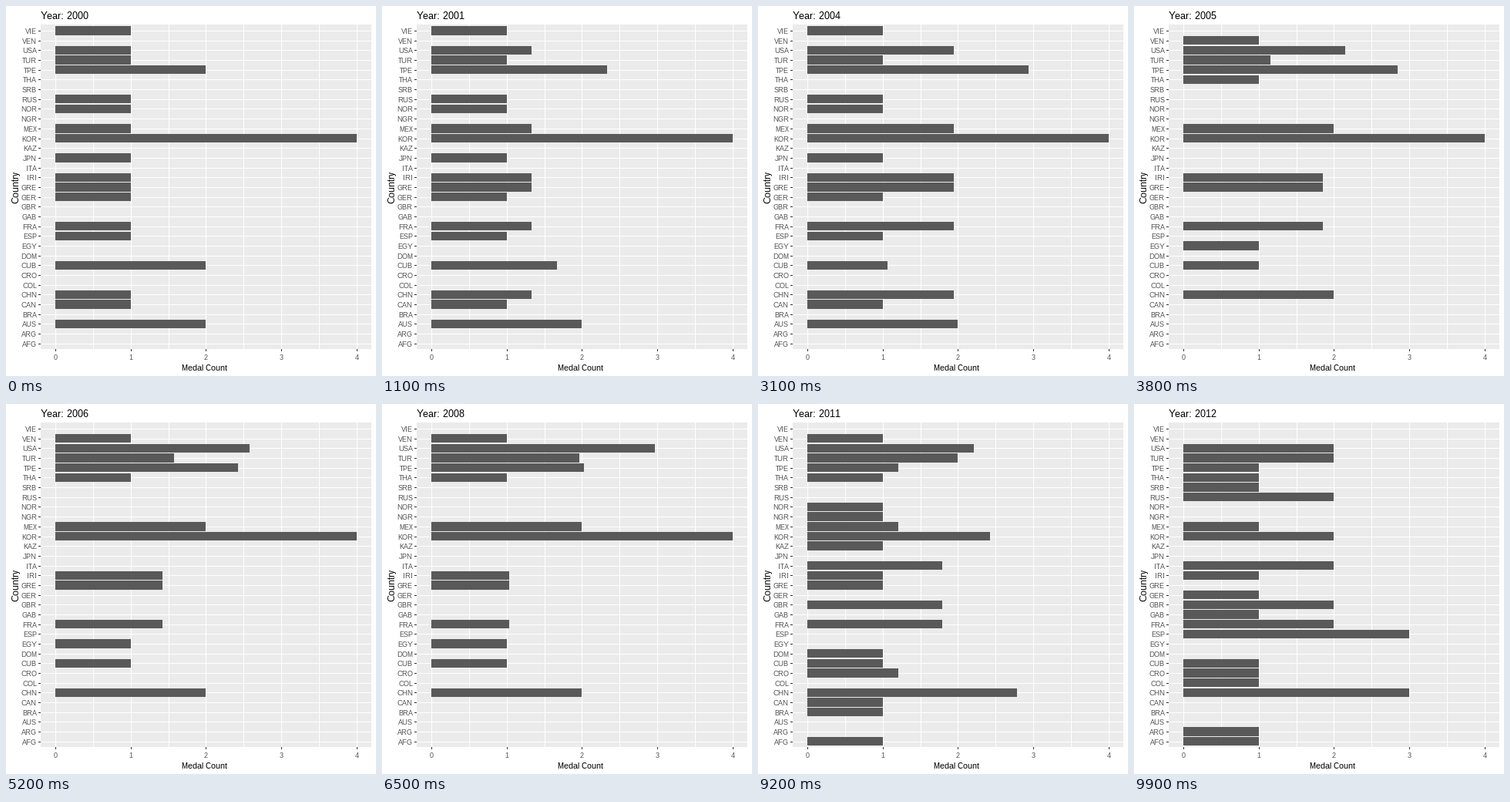
A matplotlib script for the animation above (10000 ms loop, 480 by 480 pixels).

```python
import matplotlib.pyplot as plt
from matplotlib.animation import FuncAnimation
from matplotlib.patches import Rectangle

SIZE, DPI = 480, 72
FRAMES, INTERVAL = 100, 100
LEFT, RIGHT, TOP, BOTTOM = 45, 474, 24, 445

# Medals at the games of 2000, 2004, 2008 and 2012; "-" means no entry.
MEDALS = {
    "AFG": "--11", "ARG": "---1", "AUS": "2---", "BRA": "--1-", "CAN": "1-1-",
    "CHN": "1223", "COL": "---1", "CRO": "--21", "CUB": "2111", "DOM": "--1-",
    "EGY": "-1--", "ESP": "1--3", "FRA": "1212", "GAB": "---1", "GBR": "--12",
    "GER": "1--1", "GRE": "121-", "IRI": "1211", "ITA": "--12", "JPN": "1---",
    "KAZ": "--1-", "KOR": "4442", "MEX": "1221", "NGR": "--1-", "NOR": "1-1-",
    "RUS": "1--2", "SRB": "---1", "THA": "-111", "TPE": "2321", "TUR": "1122",
    "USA": "1232", "VEN": "-11-", "VIE": "1---",
}

plt.rcParams.update({
    "font.family": "Liberation Sans",
    "text.hinting": "native",
    "text.hinting_factor": 1,
})

fig = plt.figure(figsize=(SIZE / DPI, SIZE / DPI), dpi=DPI, facecolor="white")
ax = fig.add_axes([0, 0, 1, 1])
ax.set(xlim=(0, SIZE), ylim=(SIZE, 0))
ax.axis("off")


def x_pos(value):
    return round(63.98 + 97.73 * value)


def y_pos(row):
    return round(445.4 - 12.68 * (row + 0.6))


def box(x0, y0, x1, y1, color, z=1):
    rect = Rectangle((x0, y0), x1 - x0, y1 - y0, fc=color, lw=0, zorder=z)
    return ax.add_patch(rect)


def label(x, y, text, size, color="black", **kw):
    return ax.text(x, y, text, fontsize=size, color=color, **kw)


def value_at(counts, year):
    step = min(int((year - 2000) / 4 + 1e-9), 3)
    if counts[step] == "-":
        return 0
    start = int(counts[step])
    if step == 3 or counts[step + 1] == "-":
        return start
    part = (year - 2000) / 4 - step
    return start + (int(counts[step + 1]) - start) * part


box(LEFT, TOP, RIGHT, BOTTOM, "#ebebeb")

for half in range(9):
    x = x_pos(half / 2)
    box(x, TOP, x + 1, BOTTOM, "white", 2)
    if half % 2 == 0:
        box(x, BOTTOM, x + 1, BOTTOM + 3, "#333333", 2)
        label(x, 459, str(half // 2), 9, "#4d4d4d", ha="center")

bars = {}
for row, code in enumerate(MEDALS):
    y = y_pos(row)
    box(LEFT, y, RIGHT, y + 1, "white", 2)
    box(LEFT - 3, y, LEFT, y + 1, "#333333", 2)
    label(40, y + 4, code, 9, "#4d4d4d", ha="right")
    bars[code] = box(x_pos(0), y_pos(row + 0.45), x_pos(0), y_pos(row - 0.45),
                     "#595959", 3)

title = label(45, 17, "", 13)
label(258, 473, "Medal Count", 11, ha="center")
label(18, 235, "Country", 11.5, ha="right", va="center", rotation=90)


def draw(i):
    year = 2000 + 12 * i / (FRAMES - 1)
    title.set_text(f"Year: {round(year)}")
    for code, bar in bars.items():
        bar.set_width(x_pos(value_at(MEDALS[code], year)) - x_pos(0))
    return [title, *bars.values()]


anim = FuncAnimation(fig, draw, frames=FRAMES, interval=INTERVAL,
                     init_func=lambda: draw(0), repeat=True, repeat_delay=0)
plt.show()
```
